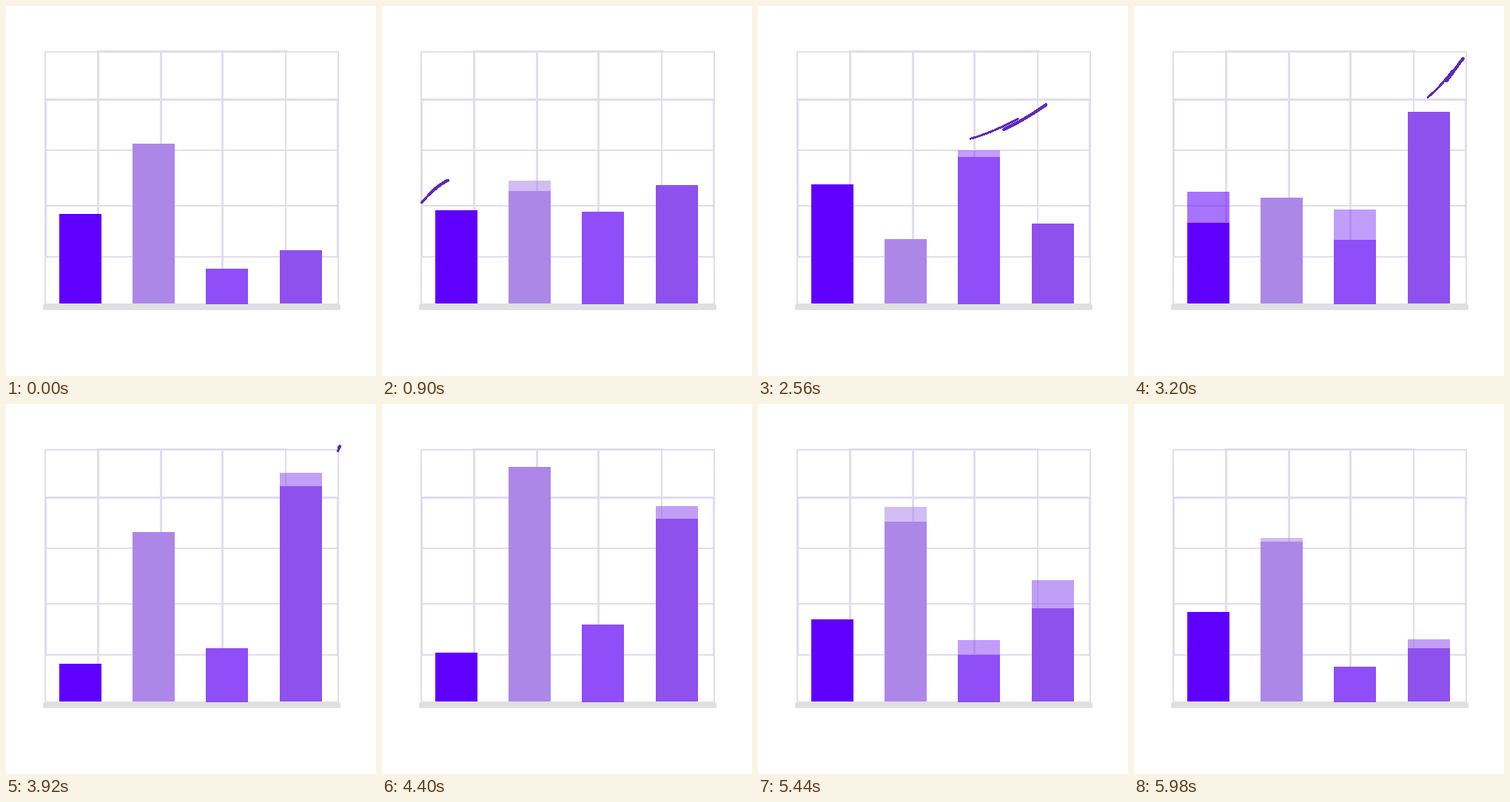
Animation of 500 by 500 pixels, one loop 6000 ms. Source, as a matplotlib script:

```python
import numpy as np
import matplotlib.pyplot as plt
from matplotlib.animation import FuncAnimation
from matplotlib.patches import FancyBboxPatch, Rectangle

SIZE, DPI = 500, 100
FRAMES, STEP = 300, 20
ECHO = 220                        # delay of the pale copy behind each bar, ms
TREND_START, TREND_STEP = 340, 560  # the trend tip passes one point per step
GRID, BASE, INK = "#e0ddec", "#e0dfe1", "#5d2bb8"


def eased(keys, t):
    """Value at time t, easing in and out between (time, value) keys."""
    for (t0, a), (t1, b) in zip(keys, keys[1:]):
        if t < t1:
            s = (t - t0) / (t1 - t0)
            return a + (b - a) * s * s * (3 - 2 * s)
    return keys[-1][1]


def spline(points, u):
    """Catmull-Rom curve through evenly timed points."""
    slopes = np.gradient(points, axis=0)
    i = np.clip(u.astype(int), 0, len(points) - 2)
    s = (u - i)[:, None]
    return ((1 + 2 * s) * (1 - s) ** 2 * points[i] + s * (1 - s) ** 2 * slopes[i]
            + s * s * (3 - 2 * s) * points[i + 1] + s * s * (s - 1) * slopes[i + 1])


class Bar:
    def __init__(self, x, bottom, color, keys):
        self.keys, self.bottom = keys, bottom
        style = dict(facecolor=color, linewidth=0, antialiased=False)
        self.echo = ax.add_patch(Rectangle((x, bottom), 57, 0, alpha=0.55, zorder=2, **style))
        self.body = ax.add_patch(Rectangle((x, bottom), 57, 0, zorder=3, **style))

    def update(self, t):
        top = round(eased(self.keys, t))
        old = min(top, round(eased(self.keys, max(t - ECHO, 0))))
        self.body.set_y(top)
        self.body.set_height(self.bottom - top)
        self.echo.set_y(old)
        self.echo.set_height(top - old)


class Stroke:
    """Part of the trend curve between two time lags behind its tip."""

    def __init__(self, width, lags, sag):
        self.lags, self.sag = lags, sag
        self.line, = ax.plot([], [], color=INK, lw=width * 72 / DPI, zorder=4,
                             antialiased=False, solid_capstyle="round")

    def update(self, t):
        last = len(TREND) - 1
        start, end = (np.clip((t - lag - TREND_START) / TREND_STEP, 0, last)
                      for lag in self.lags)
        if end > start:
            u = np.linspace(start, end, 40)
            x, y = spline(TREND, u).T
            self.line.set_data(x, y + self.sag * np.sin(np.pi * u / last))
        else:
            self.line.set_data([], [])


def draw_line(x0, y0, x1, y1, width):
    r = width / 2
    ax.add_patch(Rectangle((x0 - r, y0 - r), x1 - x0 + width, y1 - y0 + width,
                           facecolor=GRID, linewidth=0, zorder=1))


def draw_box(x0, y0, x1, y1, top, right, bottom, left):
    draw_line(x0, y0, x1, y0, top)
    draw_line(x1, y0, x1, y1, right)
    draw_line(x0, y1, x1, y1, bottom)
    draw_line(x0, y0, x0, y1, left)


fig = plt.figure(figsize=(SIZE / DPI, SIZE / DPI), dpi=DPI, facecolor="white")
ax = fig.add_axes([0, 0, 1, 1])
ax.set(xlim=(0, SIZE), ylim=(SIZE, 0))
ax.axis("off")

draw_box(53, 62, 449, 403, 2, 2, 2, 2)
draw_box(53.5, 126.5, 448.5, 339, 3, 3, 2, 3)
draw_box(124.5, 61.5, 378, 403, 3, 2, 2, 3)
for x in (209.5, 292.5):
    draw_line(x, 61.5, x, 403, 3)
for y in (195, 270):
    draw_line(53, y, 449, y, 2)
ax.add_patch(FancyBboxPatch((52, 405), 398, 4, boxstyle="round,pad=2,rounding_size=2",
                            facecolor=BASE, linewidth=0, zorder=1.5))

TREND = np.array([(53, 266), (89, 233), (179, 195), (295, 177),
                  (392, 127), (442, 72), (451, 57)], float)

parts = [
    Bar(72, 402, "#5f00ff", [(0, 281), (1640, 272), (2800, 237), (3620, 354), (6000, 281)]),
    Bar(171, 402, "#ac87e8", [(0, 186), (1000, 252), (2340, 322), (3520, 245),
                              (4380, 85), (5980, 186)]),
    Bar(270, 403, "#8f4ef7", [(0, 355), (1260, 259), (2390, 195), (3520, 345),
                              (4720, 288), (5780, 355)]),
    Bar(370, 402, "#8e51ed", [(0, 330), (1200, 226), (2400, 305), (3580, 90),
                              (4500, 157), (6000, 330)]),
    Stroke(1.8, lags=(580, 240), sag=0),
    Stroke(3, lags=(345, 0), sag=5),
]


def update(frame):
    for part in parts:
        part.update(frame * STEP)
    return []


anim = FuncAnimation(fig, update, frames=FRAMES, interval=STEP, repeat=True,
                     repeat_delay=0, blit=False)
plt.show()
```
